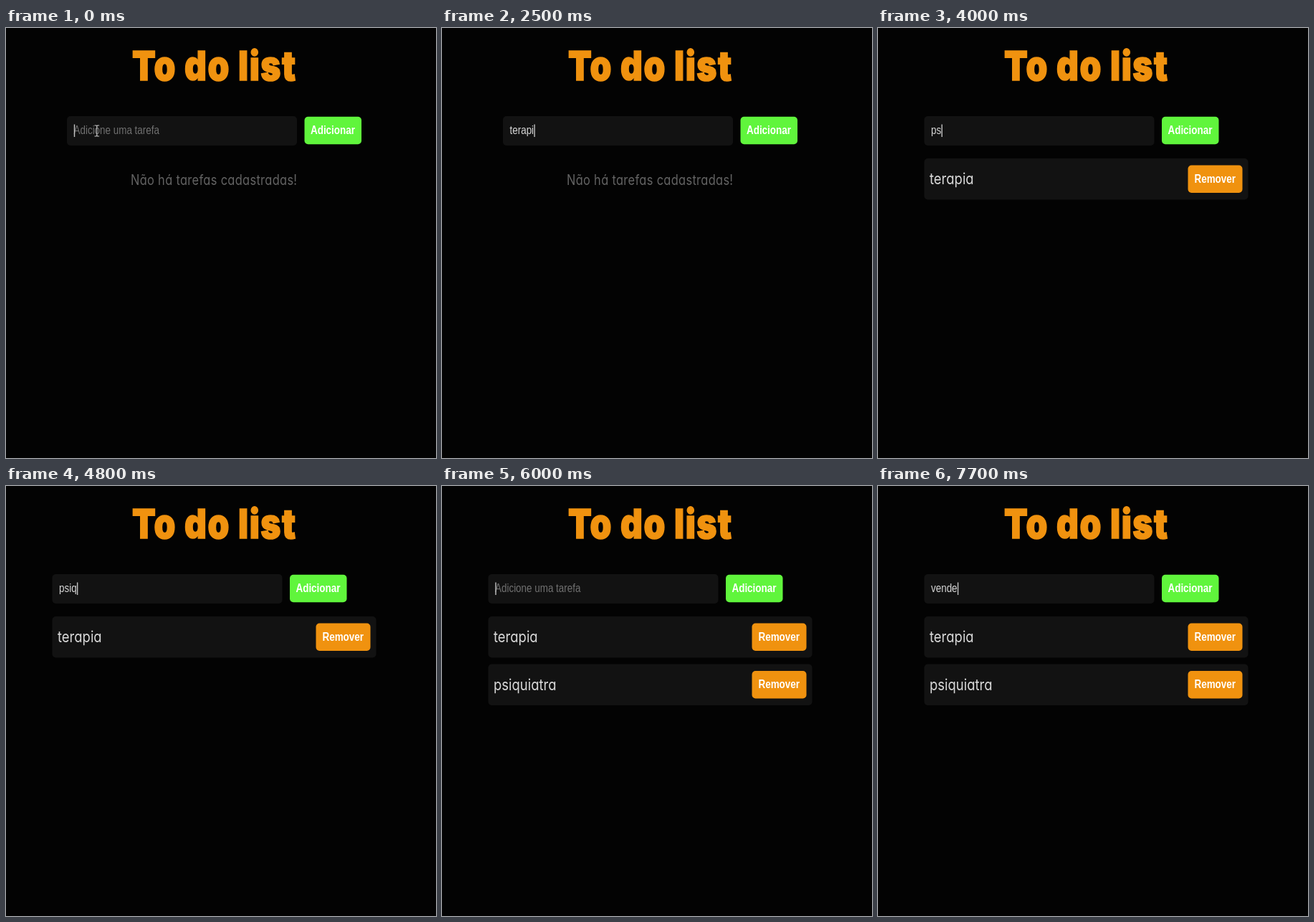
Recreate the animation shown at these times as an HTML page. Size 600x600 px, loop 8000 ms.

```html
<!DOCTYPE html>
<html lang="pt-BR">
<head>
<meta charset="utf-8">
<title>To do list</title>
<style>
  html, body { margin: 0; width: 100%; height: 100%; overflow: hidden; background: #030303; }
  svg { display: block; width: 100vw; height: 100vh; }
  text { white-space: pre; }
  .ui { font: 16px "Liberation Sans", Arial, sans-serif; }
  .bold { font-weight: 700; fill: #fff; }
  .round { font-family: Inter, "Open Sans", sans-serif; font-feature-settings: "cv11"; }
  .title { font-size: 57px; font-weight: 900; letter-spacing: 1.8px; fill: #f0920f; stroke: #f0920f; stroke-width: 1.6px; }
  .item { font-size: 22px; fill: #d8d8d8; }
  .empty { font-size: 19.5px; letter-spacing: .4px; fill: #636363; }
</style>
</head>
<body>
<svg id="stage" viewBox="0 0 600 600"></svg>
<script>
const LOOP = 8000;
const SQUEEZE = 0.84; // the whole page is shown narrower than it was laid out
const PANEL = "#121212", GREEN = "#60f53c", ORANGE = "#f0920f";

const ADD_TIMES = [[3000, "terapia"], [6000, "psiquiatra"]];
const KEYS = [
  { word: "terapia", times: [1300, 1400, 1600, 1700, 2000, 2500, 2700], end: 3000 },
  { word: "psiquiatra", times: [3400, 4000, 4100, 4800, 4900, 5000, 5300, 5500, 5700], end: 6000 },
  { word: "vende", times: [7100, 7200, 7400, 7500, 7700], end: LOOP }
];
const CARET_OFF = [[400, 1000], [6400, 7000]];

const stage = document.getElementById("stage");

function add(parent, tag, attrs, content = "") {
  const node = document.createElementNS("http://www.w3.org/2000/svg", tag);
  for (const key in attrs) node.setAttribute(key, attrs[key]);
  node.textContent = content;
  return parent.appendChild(node);
}

function label(parent, x, y, content, cls, anchor = "start") {
  return add(parent, "text", {
    class: cls, "text-anchor": anchor,
    transform: `translate(${x} ${y}) scale(${SQUEEZE} 1)`
  }, content);
}

function box(parent, x, y, width, height, fill) {
  return add(parent, "rect", { x, y, width, height, rx: 5, fill });
}

function button(parent, x, y, width, content, fill) {
  box(parent, x, y, width, 38.5, fill);
  label(parent, x + width / 2 - 0.3, y + 24, content, "ui bold", "middle");
}

function show(node, visible) {
  node.setAttribute("visibility", visible ? "visible" : "hidden");
}

label(stage, 290.8, 72.5, "To do list", "round title", "middle");

const form = add(stage, "g", {});
box(form, 85, 123, 321, 41, PANEL);
button(form, 416.5, 123.8, 79.5, "Adicionar", GREEN);
const field = label(form, 94.5, 147.6, "", "ui");
const caret = add(form, "rect", { y: 134.5, width: 1.4, height: 17.5, fill: "#c4c4c4" });

const pointer = add(stage, "path", {
  d: "M123.5 136h2.5l.8 .8 .8-.8h2.5M126.8 136.5v14M123.5 151h2.5l.8-.8 .8 .8h2.5",
  fill: "none", stroke: "#c8c8c8", "stroke-width": 1.2
});

const empty = label(stage, 290.2, 218.5, "Não há tarefas cadastradas!", "round empty", "middle");

const items = ADD_TIMES.map(([time, name], i) => {
  const group = add(stage, "g", { transform: `translate(0 ${i * 66.5})` });
  box(group, 64.5, 182, 452, 57.5, PANEL);
  label(group, 72, 218, name, "round item");
  button(group, 432.5, 191.5, 76, "Remover", ORANGE);
  return { time, group };
});

function typedAt(t) {
  const entry = KEYS.find(k => t >= k.times[0] && t < k.end);
  return entry ? entry.word.slice(0, entry.times.filter(time => time <= t).length) : "";
}

function render(t) {
  const typed = typedAt(t);
  const hasItems = t >= ADD_TIMES[0][0];

  form.setAttribute("transform", `translate(${hasItems ? -20.5 : 0} 0)`);
  field.textContent = typed || "Adicione uma tarefa";
  field.setAttribute("fill", typed ? "#d6d6d6" : "#707070");
  const advance = typed ? field.getComputedTextLength() * SQUEEZE : 0;
  caret.setAttribute("x", 94.8 + advance);

  show(caret, !CARET_OFF.some(([from, to]) => t >= from && t < to));
  show(pointer, t < KEYS[0].times[0]);
  show(empty, !hasItems);
  for (const { time, group } of items) show(group, t >= time);
}

const start = performance.now();
function tick() {
  render((performance.now() - start) % LOOP);
  requestAnimationFrame(tick);
}
tick();
</script>
</body>
</html>
```
